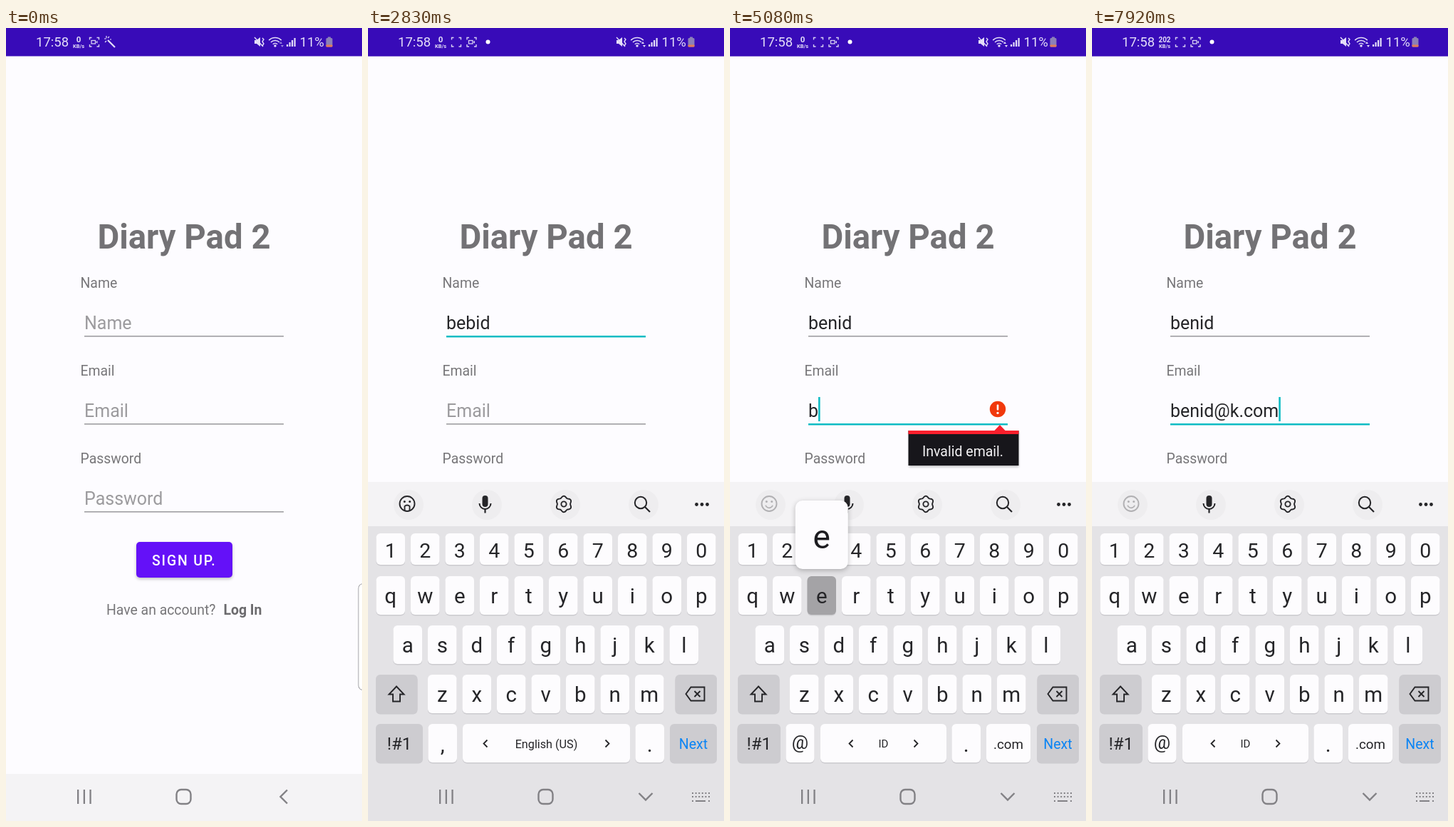
Recreate the animation shown at these times as an HTML page with a canvas. Size 500 by 1111 pixels, loop 8000 ms.

```html
<!DOCTYPE html>
<html lang="en">
<head>
<meta charset="utf-8">
<title>Sign up form</title>
<style>
html, body { margin: 0; width: 100%; height: 100%; overflow: hidden; background: #fdfcff; }
canvas { display: block; width: 500px; height: 1111px; }
</style>
</head>
<body>
<canvas id="stage" width="500" height="1111"></canvas>
<script>
const ctx = document.getElementById('stage').getContext('2d');
const LOOP = 8000, PRESS = 100;
const FOCUS_NAME = 420, FOCUS_EMAIL = 4420, EMAIL_ROW = 4580;
const TEAL = '#0fbcc4', INK = '#252528', NAV = '#828185';

// Key releases: [ms, key]; '<' is backspace
const strokes = [
  [1580, 'b'], [1830, 'e'], [2080, 'b'], [2210, 'i'], [2330, 'd'],
  [3170, '<'], [3420, '<'], [3670, '<'],
  [3830, 'n'], [4000, 'i'], [4170, 'd'],
  [5000, 'b'], [5170, 'e'], [5330, 'n'], [5500, 'i'], [5750, 'd'],
  [6080, '@'], [6420, 'k'], [6920, '.com']
];

const clamp = v => Math.min(1, Math.max(0, v));
const between = (t, a, b) => t >= a && t < b;

function text(s, x, y, size, color = INK, weight = 400, align = 'left') {
  ctx.font = `${weight} ${size}px Roboto, sans-serif`;
  ctx.textAlign = align;
  ctx.fillStyle = color;
  ctx.fillText(s, x, y);
}

function rect(x, y, w, h, color, r = 0) {
  ctx.fillStyle = color;
  ctx.beginPath();
  ctx.roundRect(x, y, w, h, r);
  ctx.fill();
}

function raised(x, y, w, h, color, r, blur) {
  ctx.save();
  ctx.shadowColor = 'rgba(0,0,0,.25)';
  ctx.shadowBlur = blur;
  ctx.shadowOffsetY = 2;
  rect(x, y, w, h, color, r);
  ctx.restore();
}

function dot(x, y, r, color) {
  ctx.fillStyle = color;
  ctx.beginPath();
  ctx.arc(x, y, r, 0, 7);
  ctx.fill();
}

function ring(x, y, r, color, width, from = 0, to = 2 * Math.PI) {
  ctx.strokeStyle = color;
  ctx.lineWidth = width;
  ctx.beginPath();
  ctx.arc(x, y, r, from, to);
  ctx.stroke();
}

function path(d, color, width) {
  const p = new Path2D(d);
  if (width) {
    ctx.strokeStyle = color;
    ctx.lineWidth = width;
    ctx.stroke(p);
  } else {
    ctx.fillStyle = color;
    ctx.fill(p);
  }
}

// ---- status bar ----
function recordIcon(x, camera) {
  const c = '#d6cff2';
  path(`M${x - 6.5} 16.5v-3h3M${x + 3.5} 13.5h3v3M${x + 6.5} 23v3h-3M${x - 3.5} 26h-3v-3`, c, 1.4);
  if (!camera) return;
  ctx.strokeStyle = c;
  ctx.lineWidth = 1.3;
  ctx.strokeRect(x - 4, 17.5, 5.5, 4.5);
  path(`M${x + 2} 19.7l2.5-2v4z`, c);
}

function statusBar(t) {
  const c = '#e4def8';
  rect(0, 0, 500, 39.5, '#380bb8');
  text('17:58', 42, 26, 18.5, c);
  const speed = t < 5170 ? '0' : t < 7920 ? '26' : '202';
  text(speed, 102, 20, speed.length > 2 ? 10 : 11.5, c, 700, 'center');
  text('KB/s', 102, 27.5, 7.5, c, 700, 'center');
  if (t < 250) {
    recordIcon(124, true);
    path('M143 17l10 10', c, 2.2);
    path('M141 11v3M138 15h3M145 12l-2 2M139 20l2-2M146 16h2', c, 1.2);
  } else {
    const camera = t < 670 || between(t, 3250, 4750) || between(t, 6000, 7580);
    recordIcon(124, camera);
    recordIcon(145.5, true);
    dot(168.5, 19.5, 3, '#fff');
  }
  path('M349 17h3l5-4v13l-5-4h-3z', c);
  path('M349 13l12 13M360 14l2 2-2 3 2 3-2 3', c, 1.4);
  for (const r of [4.5, 8.5, 12.5]) ring(378, 26, r, c, 1.6, -2.35, -.79);
  dot(378, 25, 1.7, c);
  path('M384 22l2-3 2 3zM386 24h4l-2 3z', t < 2000 ? '#9a86df' : c);
  for (let i = 0; i < 4; i++) rect(394 + i * 3.5, 23 - i * 3, 2.2, 3 + i * 3, c);
  text('11%', 412.5, 26, 18.5, c);
  rect(452, 12.5, 4, 2, '#8b80b8');
  rect(449.5, 14, 9, 12.5, '#8b80b8', 1.5);
  rect(449.5, 23.5, 9, 3, '#e27a58', 1);
}

// ---- form ----
function typed(t) {
  const out = { name: '', email: '', edit: t >= FOCUS_EMAIL ? FOCUS_EMAIL : FOCUS_NAME };
  for (const [at, key] of strokes) {
    if (at > t) break;
    const field = at < FOCUS_EMAIL ? 'name' : 'email';
    out[field] = key === '<' ? out[field].slice(0, -1) : out[field] + key;
    out.edit = Math.max(out.edit, at);
  }
  return out;
}

function field(label, y, value, focused, caret) {
  text(label, 104.5, y, 19.4, '#777679');
  text(value || label, 110, y + 58, 25, value ? INK : '#9c9b9e');
  if (focused) rect(110, y + 67, 280, 2.5, TEAL);
  else rect(110, y + 67.3, 280, 1.3, '#858487');
  if (focused && caret) {
    const w = value ? ctx.measureText(value).width : 0;
    rect(110 + w, y + 30, 2.6, 34, TEAL);
  }
}

function form(t) {
  const state = typed(t);
  const caret = (t - state.edit) % 1000 < 500;
  rect(0, 39.5, 500, 1006, '#fdfcff');
  text('Diary Pad 2', 250, 308.5, 47.3, '#737275', 700, 'center');
  field('Name', 364, state.name, between(t, FOCUS_NAME, FOCUS_EMAIL), caret);
  field('Email', 487, state.email, t >= FOCUS_EMAIL, caret);
  field('Password', 610, '', false, false);

  raised(183, 720, 135, 50, '#6411f8', 5, 4);
  ctx.letterSpacing = '1.85px';
  text('SIGN UP.', 205, 753, 19.4, '#fff', 500);
  ctx.letterSpacing = '0px';
  text('Have an account?', 141, 822, 19.4, '#777679');
  text('Log In', 305.5, 822, 19.4, '#6b6a6d', 700);
  rect(494.5, 778, 20, 150, '#a5a4a8', 7);
  rect(495.5, 779, 20, 148, '#fff', 6);

  if (between(t, 5000, 6920)) {
    dot(376, 534, 11.2, '#f1390c');
    rect(374.7, 527.5, 2.6, 8, '#fff', 1);
    dot(376, 539.3, 1.6, '#fff');
  }
  ctx.globalAlpha = clamp((t - 4960) / 100) * clamp((7170 - t) / 200);
  path('M370.5 565l8.5-9 8.5 9z', '#f81f2c');
  raised(250.5, 564, 155, 49, '#17161b', 0, 3);
  rect(250.5, 564, 155, 5, '#f81f2c');
  text('Invalid email.', 270, 600, 19.5, '#f4f3f5');
  ctx.globalAlpha = 1;
}

// ---- keyboard ----
const key = (label, x, y, w, h, size, base, color) => ({ label, x, y, w, h, size, base, color });

function letterRow(chars, x, y, h, size, base) {
  return [...chars].map((c, i) => key(c, x + i * 48.5, y, 40.5, h, size, base));
}

const mainKeys = [
  ...letterRow('1234567890', 11.5, 708, 44, 28.5, 34),
  ...letterRow('qwertyuiop', 11.5, 768, 54, 29.5, 38),
  ...letterRow('asdfghjkl', 35.5, 837, 54, 29.5, 38),
  ...letterRow('zxcvbnm', 84, 906, 54, 29.5, 38),
  key('shift', 11, 906, 58.5, 54), key('<', 431.5, 906, 58.5, 54)
];
const nameRow = [
  key('!#1', 11, 975, 66, 54, 24, 36), key(',', 84.5, 975, 40.5, 54, 30, 39),
  key('English (US)', 133, 975, 235, 54, 16.2, 33.5),
  key('.', 375.5, 975, 40.5, 54, 30, 39), key('Next', 424, 975, 66, 54, 19.5, 35, '#0a84f4')
];
const emailRow = [
  key('!#1', 10.5, 975, 60.5, 54, 24, 36), key('@', 78.5, 975, 40, 54, 26, 35),
  key('ID', 127, 975, 177, 54, 15, 33),
  key('.', 311.5, 975, 40.5, 54, 30, 39), key('.com', 360, 975, 62, 54, 18.8, 34.5),
  key('Next', 431, 975, 59, 54, 19.5, 35, '#0a84f4')
];
const darkKeys = ['shift', '<', '!#1', 'Next'];

function drawKey(k, down) {
  const cx = k.x + k.w / 2;
  rect(k.x, k.y + 1.5, k.w, k.h, '#cccbcf', 6);
  rect(k.x, k.y, k.w, k.h, down ? '#a4a3a6' : darkKeys.includes(k.label) ? '#cdccd0' : '#fdfcfe', 6);
  if (k.label === 'shift') {
    path('M40 922.5l10.5 11h-5.5v10h-10v-10h-5.5z', INK, 1.9);
  } else if (k.label === '<') {
    path('M446.5 933l7-9.5h19v19h-19zM458.5 929l8 8M466.5 929l-8 8', INK, 1.9);
  } else {
    text(k.label, cx, k.y + k.base, k.size, k.color, 400, 'center');
  }
  if (k.w > 100) {
    const d = k.w > 200 ? 86 : 46;
    path(`M${cx - d + 3} 997.5l-5 5 5 5M${cx + d - 3} 997.5l5 5-5 5`, INK, 1.8);
  }
}

function popup(k) {
  const x = k.x + k.w / 2 - 37, y = k.y - 106;
  raised(x, y, 74, 96, '#fdfcfe', 10, 7);
  text(k.label, x + 37, y + 67, 46, '#1d1d20', 400, 'center');
}

function toolbar(t) {
  rect(0, 636, 500, 62, '#f4f3f5');
  for (let i = 0; i < 4; i++) dot(57 + i * 110, 668, 21, '#eeedef');

  ctx.globalAlpha = t < EMAIL_ROW ? 1 : .3;
  ring(55, 666.5, 10.5, INK, 1.9);
  dot(51.3, 663.5, 1.5, INK);
  dot(58.7, 663.5, 1.5, INK);
  if (between(t, 2500, 3250)) path('M51.5 676v-6q3.5-3 7 0v6', INK, 1.8);
  else ring(55, 667, 5.3, INK, 1.7, .35, 2.8);
  ctx.globalAlpha = 1;

  rect(160.5, 655, 8, 16, INK, 4);
  ring(164.5, 666, 8, INK, 2, 0, Math.PI);
  path('M164.5 674v5.5', INK, 2.2);

  ctx.beginPath();
  for (let a = 0; a < 6.28; a += .1) {
    const r = 10.2 - 1.1 * Math.cos(6 * a);
    ctx.lineTo(275 + r * Math.cos(a), 667 + r * Math.sin(a));
  }
  ctx.closePath();
  ctx.lineWidth = 1.9;
  ctx.stroke();
  ring(275, 667, 3.6, INK, 1.9);

  ring(383, 665, 8.2, INK, 2);
  path('M389 671l7 7', INK, 2.2);
  for (const x of [461.5, 469, 476.5]) dot(x, 667.5, 2.4, INK);
}

function keyboard(t) {
  const slide = 475 * (1 - clamp((t - 750) / 320)) ** 4;
  if (slide >= 475) return;
  ctx.save();
  ctx.translate(0, slide);
  rect(0, 697, 500, 414, '#e4e3e6');
  toolbar(t);
  const hit = strokes.find(([at]) => between(t, at - PRESS, at));
  const keys = mainKeys.concat(t < EMAIL_ROW ? nameRow : emailRow);
  const down = hit && keys.find(k => k.label === hit[1]);
  for (const k of keys) drawKey(k, k === down);
  if (down && down.label.length === 1 && down.label !== '<') popup(down);
  ctx.restore();
}

// ---- navigation ----
function navigation(t) {
  for (const x of [100, 108.7, 117.4]) rect(x, 1067, 2.3, 20, NAV);
  ctx.strokeStyle = NAV;
  ctx.lineWidth = 2.4;
  ctx.beginPath();
  ctx.roundRect(239.5, 1067, 20, 20, 6.5);
  ctx.stroke();

  const turn = clamp((t - 540) / 130);
  ctx.save();
  ctx.translate(390, 1077);
  ctx.rotate(-turn * Math.PI / 2);
  path('M5-9.5l-9.5 9.5 9.5 9.5', NAV, 2.4);
  ctx.restore();

  ctx.globalAlpha = turn;
  for (let i = 0; i < 6; i++) {
    rect(455 + i * 4.6, 1071, 2, 2, NAV);
    rect(455 + i * 4.6, 1076, 2, 2, NAV);
  }
  rect(455, 1082, 2, 2, NAV);
  rect(460, 1082, 14, 2, NAV);
  rect(478, 1082, 2, 2, NAV);
  ctx.globalAlpha = 1;
}

function frame(now) {
  const t = now % LOOP;
  form(t);
  rect(0, 1045, 500, 66, '#f4f3f5');
  keyboard(t);
  navigation(t);
  statusBar(t);
  requestAnimationFrame(frame);
}

requestAnimationFrame(frame);
</script>
</body>
</html>
```
